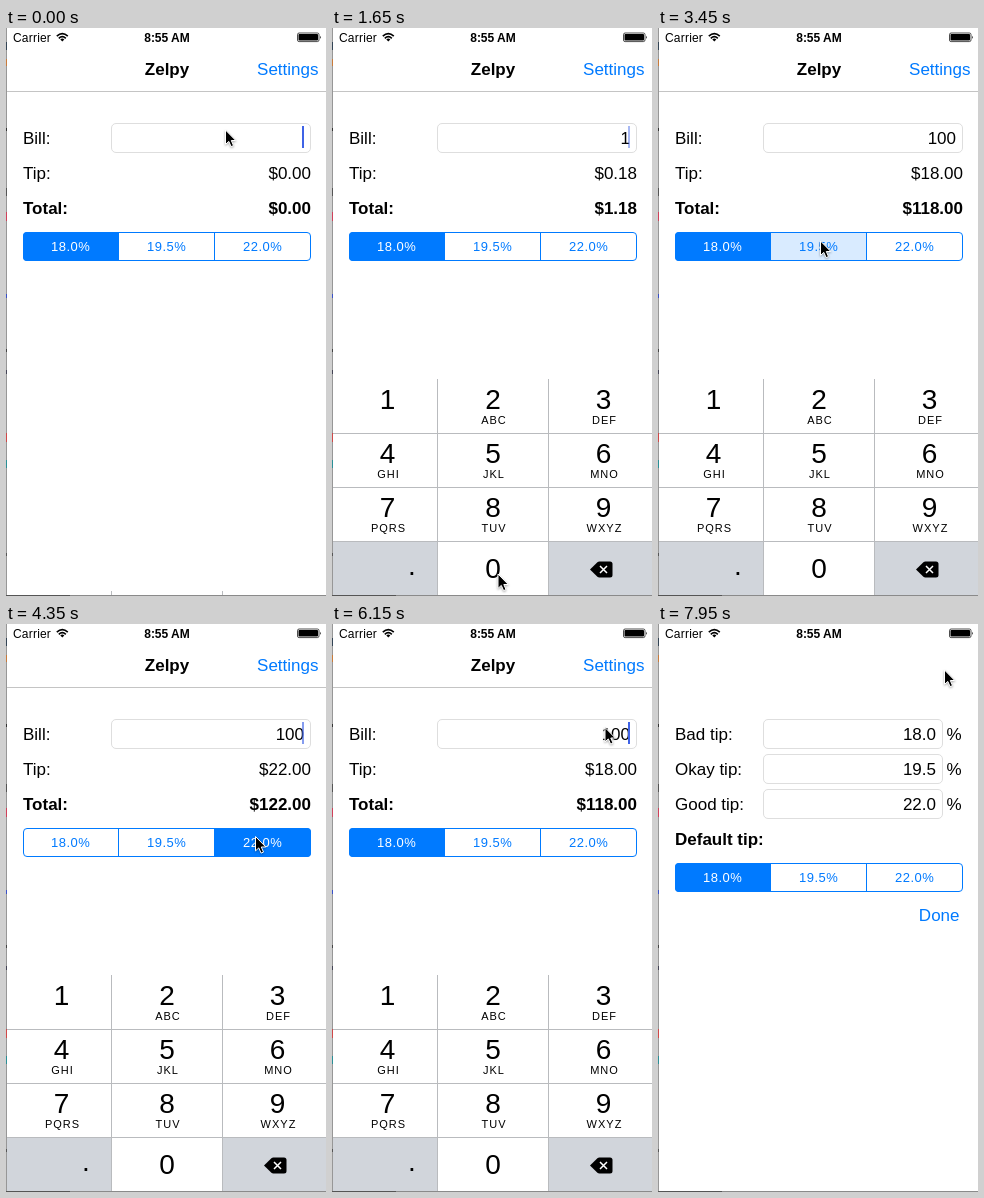
An HTML page that plays this animation: 320 by 568 pixels, repeating every 8000 ms.

```html
<!DOCTYPE html>
<html lang="en">
<head>
<meta charset="utf-8">
<title>Tip calculator</title>
<style>
  html, body { margin: 0; width: 100%; height: 100%; overflow: hidden; background: #fff; }
  svg { display: block; width: 320px; height: 568px; }
  text { font: 17px "Liberation Sans", Arial, sans-serif; white-space: pre; }
  .b { font-weight: 700; }
  .end { text-anchor: end; }
  .mid { text-anchor: middle; }
  .link { fill: #007aff; }
  .field { fill: #fff; stroke: #dedede; }
  .status { font-size: 12px; }
  .seg { font-size: 13px; letter-spacing: .5px; text-anchor: middle; }
  .digit { font-size: 28px; text-anchor: middle; }
  .abc { font-size: 11px; letter-spacing: 1px; text-anchor: middle; }
  .rule { fill: none; stroke: #b9bbbe; }
  #cursor { filter: drop-shadow(0 1px 1px #0005); }
</style>
</head>
<body>
<svg viewBox="0 0 320 568">
  <rect width="320" height="568" fill="#fff"/>

  <g id="main">
    <text class="b mid" x="161" y="47">Zelpy</text>
    <text class="link end" id="settings" x="312.5" y="47">Settings</text>
    <path d="M1 63.5H320" stroke="#c4c4c4"/>
    <text x="17" y="116">Bill:</text>
    <rect class="field" x="105.5" y="95.5" width="199" height="29" rx="4.5"/>
    <text class="end" id="bill" x="298" y="116"></text>
    <rect id="caret" x="296" y="98" width="2" height="22" fill="#3f63e6"/>
    <text x="17" y="151">Tip:</text>
    <text class="end" id="tip" x="305" y="151"></text>
    <text class="b" x="17" y="186">Total:</text>
    <text class="b end" id="total" x="305" y="186"></text>
    <g id="rates" transform="translate(17 204)"></g>
  </g>

  <g id="modal">
    <rect width="320" height="568" fill="#fff"/>
    <g id="presets"></g>
    <text class="b" x="17" y="221">Default tip:</text>
    <g id="defaults" transform="translate(17 239)"></g>
    <text class="link end" x="301.5" y="297">Done</text>
  </g>

  <g id="pad">
    <rect x="1" y="351" width="319" height="217" fill="#fff"/>
    <path d="M1 514H105V568H1ZM217 514H320V568H217Z" fill="#d1d5db"/>
    <rect id="press" width="110" height="54" fill="#d1d5db"/>
    <path class="rule" d="M105.5 351V568M216.5 351V568M1 405.5H320M1 459.5H320M1 513.5H320"/>
    <g id="keys"></g>
    <text class="digit" x="80" y="547">.</text>
    <path d="M258 541.5L265.4 534.2Q266.2 533.5 267.4 533.5H278A2.5 2.5 0 0 1 280.5 536V547A2.5 2.5 0 0 1 278 549.5H267.4Q266.2 549.5 265.4 548.8Z"/>
    <path d="M268 538L275 545M275 538L268 545" stroke="#fff" stroke-width="1.5"/>
  </g>

  <g id="bar">
    <text class="status" x="7" y="13.5" letter-spacing=".2">Carrier</text>
    <g fill="none" stroke="#000" stroke-width="1.6">
      <path d="M50.8 8.2Q56.3 3 61.8 8.2M52.8 10.3Q56.3 7 59.8 10.3"/>
      <path d="M56.3 13.4L54.3 11.4Q56.3 9.8 58.3 11.4Z" fill="#000" stroke="none"/>
    </g>
    <text class="status b mid" x="161" y="13.5">8:55 AM</text>
    <rect x="291.5" y="5" width="21.5" height="8.6" rx="1.6" fill="none" stroke="#000" stroke-width=".7"/>
    <rect x="292.5" y="6" width="19.5" height="6.6" rx=".8"/>
    <path d="M314 7.7Q315.6 9.3 314 10.9Z"/>
  </g>

  <g id="edge">
    <rect width="1" height="568" fill="#979797"/>
    <rect y="567" width="320" height="1" fill="#8a8a8a"/>
    <rect y="567" width="64" height="1" fill="#555"/>
  </g>

  <path id="cursor" d="M0 0V14.4L3.3 11.4L5.6 16.6L8 15.6L5.8 10.5H10.3Z" stroke="#fff"/>
</svg>
<script>
const $ = id => document.getElementById(id);
const LOOP = 8000, STEP = 150;
const RATES = [18, 19.5, 22];

function add(parent, tag, attrs, text = "") {
  const el = document.createElementNS("http://www.w3.org/2000/svg", tag);
  for (const k in attrs) el.setAttribute(k, attrs[k]);
  el.textContent = text;
  parent.append(el);
  return el;
}

// Segmented control; returns a function that paints its state
function segments(box) {
  const cells = RATES.map((r, i) => add(box, "path", {
    d: ["M96 0H4Q0 0 0 4V25Q0 29 4 29H96Z", "M96 0H192V29H96Z",
        "M192 0H284Q288 0 288 4V25Q288 29 284 29H192Z"][i]
  }));
  add(box, "rect", { x: .5, y: .5, width: 287, height: 28, rx: 3.5, fill: "none", stroke: "#007aff" });
  add(box, "path", { d: "M95.5 0V29M191.5 0V29", stroke: "#007aff" });
  const labels = RATES.map((r, i) =>
    add(box, "text", { class: "seg", x: 47.7 + 96 * i, y: 19 }, r.toFixed(1) + "%"));
  return (on, held) => RATES.forEach((r, i) => {
    cells[i].setAttribute("fill", i === on ? "#007aff" : i === held ? "#d9ebff" : "#fff");
    labels[i].setAttribute("fill", i === on ? "#fff" : "#007aff");
  });
}

const paintRates = segments($("rates"));
segments($("defaults"))(0);

["Bad", "Okay", "Good"].forEach((name, i) => {
  const y = 116 + 35 * i, g = $("presets");
  add(g, "text", { x: 17, y }, name + " tip:");
  add(g, "rect", { class: "field", x: 105.5, y: y - 20.5, width: 179, height: 29, rx: 4.5 });
  add(g, "text", { class: "end", x: 278, y }, RATES[i].toFixed(1));
  add(g, "text", { x: 288.5, y }, "%");
});

const COLS = [55.5, 161, 271.5];
["", "ABC", "DEF", "GHI", "JKL", "MNO", "PQRS", "TUV", "WXYZ"].forEach((abc, i) => {
  const x = COLS[i % 3], y = 381 + 54 * Math.floor(i / 3);
  add($("keys"), "text", { class: "digit", x, y }, i + 1);
  add($("keys"), "text", { class: "abc", x: x + 1, y: y + 15 }, abc);
});
add($("keys"), "text", { class: "digit", x: COLS[1], y: 550 }, 0);

// Slivers of the desktop behind the left edge
[[14, 8, "#345"], [31, 7, "#c97b3a"], [100, 3, "#333"], [160, 8, "#555"], [184, 9, "#d0405a"],
 [266, 4, "#3950c8"], [321, 3, "#444"], [342, 4, "#445"], [405, 9, "#d04848"], [432, 8, "#2a8f96"],
 [525, 3, "#555"]].forEach(([y, height, fill]) => add($("edge"), "rect", { y, width: 1, height, fill }));

const clamp = v => Math.min(1, Math.max(0, v));
const easeOut = u => 1 - (1 - clamp(u)) ** 3;

// Value of the last [time, value] entry that has been reached
const latest = (list, t) => list.filter(e => e[0] <= t).pop()[1];

const PATH = [
  [0, 219.5, 102], [300, 219.5, 102], [750, 110, 290], [1050, 58, 371], [1350, 58, 371],
  [1650, 166, 546], [2250, 166, 546], [2700, 292, 186], [2850, 294, 184], [3300, 162.5, 213],
  [3600, 162.5, 213], [3900, 215, 220], [4050, 249.5, 212.5], [4650, 249.5, 212.5],
  [5250, 69, 213], [5550, 69, 213], [5850, 150, 271], [6150, 273, 103.5], [6300, 276, 67],
  [6600, 286.5, 46], [LOOP, 286.5, 46]
];

function along(t) {
  const i = PATH.findIndex(p => p[0] > t), [t0, x0, y0] = PATH[i - 1], [t1, x1, y1] = PATH[i];
  const u = (t - t0) / (t1 - t0);
  return [x0 + (x1 - x0) * u, y0 + (y1 - y0) * u];
}

const BILL = [[0, 0], [1350, 1], [1950, 10], [2100, 100]];
const RATE = [[0, 0], [3600, 1], [4350, 2], [5550, 0]];
const HELD = [[0, -1], [3450, 1], [3600, -1], [4200, 2], [4350, -1], [5400, 0], [5550, -1]];
const KEY = [[0, ""], [1200, "1 351"], [1350, ""], [1800, "106 514"], [1950, ""]];
const FADE = [[0, 1], [7050, .2], [7500, .6], [7650, 1]];

function caretAlpha(t) {
  const typed = t < 1350 ? 0 : t < 1950 ? 1350 : 2000;
  const p = (t - typed) % 1000;
  return p < 600 ? 1 - clamp((p - 240 - (typed === 2000 ? 70 : 0)) / 110) : clamp((p - 600) / 120);
}

function draw(t) {
  const bill = latest(BILL, t), rate = latest(RATE, t), key = latest(KEY, t);
  const tip = bill * RATES[rate] / 100;
  $("bill").textContent = bill || "";
  $("tip").textContent = "$" + tip.toFixed(2);
  $("total").textContent = "$" + (bill + tip).toFixed(2);
  paintRates(rate, latest(HELD, t));

  const shown = easeOut((t + 4) / 500), gone = easeOut((t - 7345) / 500);
  $("pad").setAttribute("transform", `translate(0 ${Math.round(217 * (1 - shown + gone))})`);
  $("modal").setAttribute("transform", `translate(0 ${Math.round(568 * (1 - gone))})`);
  $("press").setAttribute("visibility", key ? "visible" : "hidden");
  $("press").setAttribute("transform", `translate(${key || "0 0"})`);

  $("caret").setAttribute("opacity", caretAlpha(t));
  $("settings").setAttribute("opacity", latest(FADE, t));
  $("cursor").setAttribute("transform", `translate(${along(t)})`);
}

const start = performance.now();
function tick() {
  const t = (performance.now() - start) % LOOP;
  draw(Math.floor(t / STEP) * STEP);
  requestAnimationFrame(tick);
}
tick();
</script>
</body>
</html>
```
